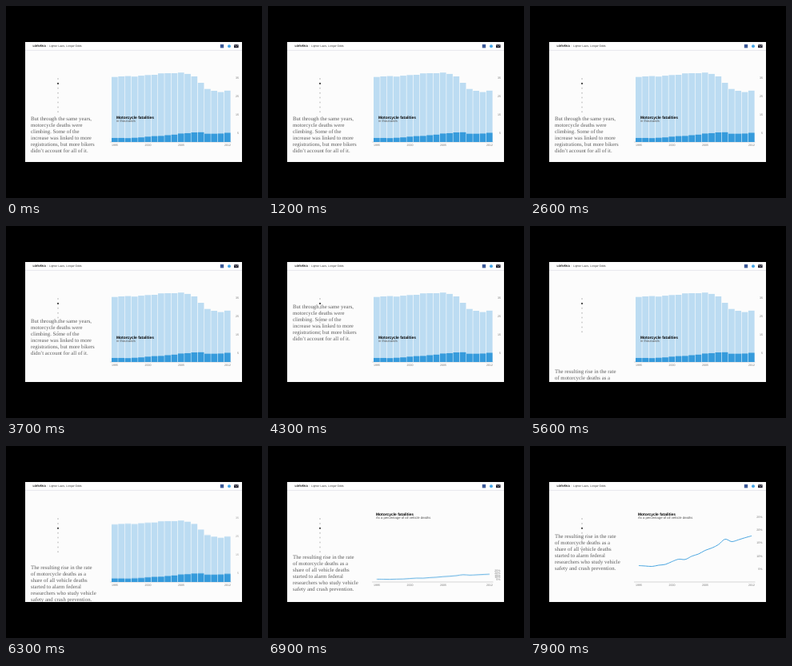
Recreate the animation shown at these times as an HTML page. Size 320x240 px, loop 8000 ms.

```html
<!DOCTYPE html>
<html lang="en">
<head>
<meta charset="utf-8">
<title>Motorcycle fatalities</title>
<style>
html, body { margin: 0; width: 100%; height: 100%; overflow: hidden; background: #000; }
svg { display: block; width: 320px; height: 240px; font-family: "Liberation Sans", Arial, sans-serif; }
text { text-rendering: geometricPrecision; }
.story { font: 6.8px "Liberation Serif", Times, serif; fill: #5c5c5c; }
.tick { font-size: 3.6px; fill: #777; }
.title { font-size: 4.9px; font-weight: bold; fill: #000; }
.unit { font-size: 4.2px; fill: #555; }
.dot { fill: #cfcfcf; }
.active { fill: #444; }

.first, .second, .bars, .line, .share, .shareTick, .shareTicks, .count, .countTicks, .dotA, .dotB {
  animation: 8s linear infinite both;
}
.bars, .line { transform-origin: 0 170px; }
.line { fill: none; stroke: #4ba6e0; stroke-width: 1; vector-effect: non-scaling-stroke; }

.first { animation-name: scrollFirst, fadeFirst; }
@keyframes scrollFirst {
  0%, 38.75% { transform: translateY(0); }
  46.25% { transform: translateY(-22px); }
  48.75%, 50.6% { transform: translateY(-27px); }
  53.75%, 55.6% { transform: translateY(-40px); }
  58.75%, 60.6% { transform: translateY(-54px); }
  62.5% { transform: translateY(-67px); }
  66.25%, 68% { transform: translateY(-74px); }
  72.5%, 100% { transform: translateY(-108px); }
}
@keyframes fadeFirst {
  0%, 60.6% { opacity: 1; }
  62.5% { opacity: .85; }
  66.25% { opacity: .5; }
  70%, 100% { opacity: 0; }
}

.second { animation-name: scrollSecond; }
@keyframes scrollSecond {
  0%, 67.5% { transform: translateY(60px); }
  72.5%, 75.6% { transform: translateY(26px); }
  78.75%, 80.6% { transform: translateY(13px); }
  85%, 90% { transform: translateY(0); }
  95%, 96.9% { transform: translateY(-14px); }
  98.75%, 100% { transform: translateY(-26px); }
}

.bars { animation-name: collapse; }
@keyframes collapse {
  0%, 76.5% { transform: scaleY(1); animation-timing-function: cubic-bezier(.65, 0, .35, 1); }
  84%, 100% { transform: scaleY(0); }
}
.line { animation-name: grow, reveal; }
@keyframes grow {
  0%, 81.9% { transform: scaleY(0); animation-timing-function: cubic-bezier(.65, 0, .35, 1); }
  94.4%, 100% { transform: scaleY(1); }
}
.shareTick { animation-name: rise; }
@keyframes rise {
  0%, 81.9% { transform: translateY(var(--drop)); animation-timing-function: cubic-bezier(.65, 0, .35, 1); }
  94.4%, 100% { transform: translateY(0); }
}
.share, .shareTicks { animation-name: reveal; }
@keyframes reveal {
  0%, 81.9% { opacity: 0; }
  84.5%, 100% { opacity: 1; }
}
.countTicks { animation-name: dim; }
@keyframes dim {
  0%, 77.5% { opacity: 1; }
  82%, 100% { opacity: 0; }
}
.count, .dotA { animation-name: cutOut; }
@keyframes cutOut {
  0%, 76.24% { opacity: 1; }
  76.25%, 100% { opacity: 0; }
}
.dotB { animation-name: cutIn; }
@keyframes cutIn {
  0%, 76.24% { opacity: 0; }
  76.25%, 100% { opacity: 1; }
}
</style>
</head>
<body>
<svg viewBox="0 0 320 240">
  <clipPath id="page"><rect x="24" y="45.5" width="271" height="149.5"/></clipPath>
  <g clip-path="url(#page)">
    <rect x="24" y="45" width="271" height="150" fill="#fcfcfc"/>

    <g id="dots"></g>
    <text class="story first" id="first"></text>
    <text class="story second" id="second"></text>

    <path d="M130 170H281.5" stroke="#c4c4c4" stroke-width=".7"/>
    <g class="bars" id="bars"></g>
    <path class="line" id="line"/>
    <g id="years" text-anchor="middle"></g>
    <g class="countTicks" id="counts" text-anchor="end"></g>
    <g class="shareTicks" id="shares" text-anchor="end"></g>

    <g class="count">
      <text class="title" x="138" y="141.4">Motorcycle fatalities</text>
      <text class="unit" x="138" y="145.3">in thousands</text>
    </g>
    <g class="share">
      <text class="title" x="135" y="86.8">Motorcycle fatalities</text>
      <text class="unit" x="135" y="91.2">As a percentage of all vehicle deaths</text>
    </g>

    <rect x="24" y="45" width="271" height="10" fill="#fff"/>
    <path d="M24 55.4H295" stroke="#dfdfe6" stroke-width=".7"/>
    <text x="33.5" y="51.3" font-size="3.4" font-weight="bold">LORVEKA</text>
    <text x="51" y="51.3" font-size="3.4" fill="#aaa">/</text>
    <text x="54" y="51.3" font-size="3.4" fill="#333">Lighter Laws, Longer Odds</text>
    <rect x="267.8" y="48" width="4.4" height="4.4" fill="#3b5998"/>
    <circle cx="279" cy="50.2" r="2" fill="#45a5e6"/>
    <rect x="285" y="48.2" width="5.6" height="4" fill="#1c1c2c"/>
    <path d="M285.2 48.5L287.8 50.6L290.4 48.5" fill="none" stroke="#fff" stroke-width=".5"/>
  </g>
</svg>
<script>
const BASE = 170, LEFT = 132, STEP = 8.29;
const totalTops = [88.7, 88, 87.6, 88.2, 87.1, 86.3, 86, 84.2, 84, 84, 83.2, 84.9, 88, 96, 103.7, 106, 107.6, 105.8];
const riders = [2.2, 2.2, 2.1, 2.3, 2.5, 2.9, 3.2, 3.3, 3.7, 4, 4.6, 4.8, 5.2, 5.3, 4.5, 4.5, 4.6, 5];
const shareY = [149.5, 150, 150.5, 149, 148, 144.5, 141.5, 141.8, 137.7, 135, 130.5, 127.5, 123.3, 116.5, 119.5, 117.3, 114.7, 112.4];

function add(parent, tag, attrs, content = "") {
  const node = document.createElementNS("http://www.w3.org/2000/svg", tag);
  for (const key in attrs) node.setAttribute(key, attrs[key]);
  node.textContent = content;
  (typeof parent === "string" ? document.getElementById(parent) : parent).append(node);
  return node;
}

function addLines(id, top, lines) {
  lines.forEach((line, i) => add(id, "tspan", { x: 31, y: top + i * 8 }, line));
}

// Catmull-Rom spline as cubic Béziers
function smooth(points) {
  const at = i => points[Math.max(0, Math.min(points.length - 1, i))];
  let d = "M" + points[0];
  for (let i = 0; i < points.length - 1; i++) {
    const [a, b, c, e] = [at(i - 1), at(i), at(i + 1), at(i + 2)];
    const c1 = b.map((v, k) => v + (c[k] - a[k]) / 6);
    const c2 = c.map((v, k) => v - (e[k] - b[k]) / 6);
    d += `C${c1} ${c2} ${c}`;
  }
  return d;
}

addLines("first", 143.3, [
  "But through the same years,", "motorcycle deaths were", "climbing. Some of the",
  "increase was linked to more", "registrations, but more bikers", "didn’t account for all of it."
]);
addLines("second", 141.3, [
  "The resulting rise in the rate", "of motorcycle deaths as a", "share of all vehicle deaths",
  "started to alarm federal", "researchers who study vehicle", "safety and crash prevention."
]);

for (let i = 0; i < 8; i++) add("dots", "circle", { class: "dot", cx: 65, cy: 91 + i * 5.9, r: 1 });
add("dots", "circle", { class: "active dotA", cx: 65, cy: 96.9, r: 1.1 });
add("dots", "circle", { class: "active dotB", cx: 65, cy: 102.8, r: 1.1 });

function bar(i, top, fill) {
  add("bars", "rect", { x: LEFT + i * STEP, y: top, width: STEP - .6, height: BASE - top, fill });
}
totalTops.forEach((top, i) => {
  bar(i, top, "#bcdcf2");
  bar(i, BASE - riders[i] * 2.3, "#369bdc");
});

document.getElementById("line").setAttribute("d", smooth(shareY.map((y, i) => [136 + i * STEP, y])));

for (const year of [1995, 2000, 2005, 2012]) {
  add("years", "text", { class: "tick", x: 136 + (year - 1995) * STEP, y: 174.7 }, year);
}
for (const n of [5, 15, 25, 35]) {
  add("counts", "text", { class: "tick", x: 291, y: BASE - n * 2.3 + 1 }, n);
}
for (const n of [5, 10, 15, 20, 25]) {
  const drop = n * 3.24;
  add("shares", "text", { class: "tick shareTick", x: 290.5, y: BASE - drop + .9, style: `--drop:${drop}px` }, n + "%");
}
</script>
</body>
</html>
```
